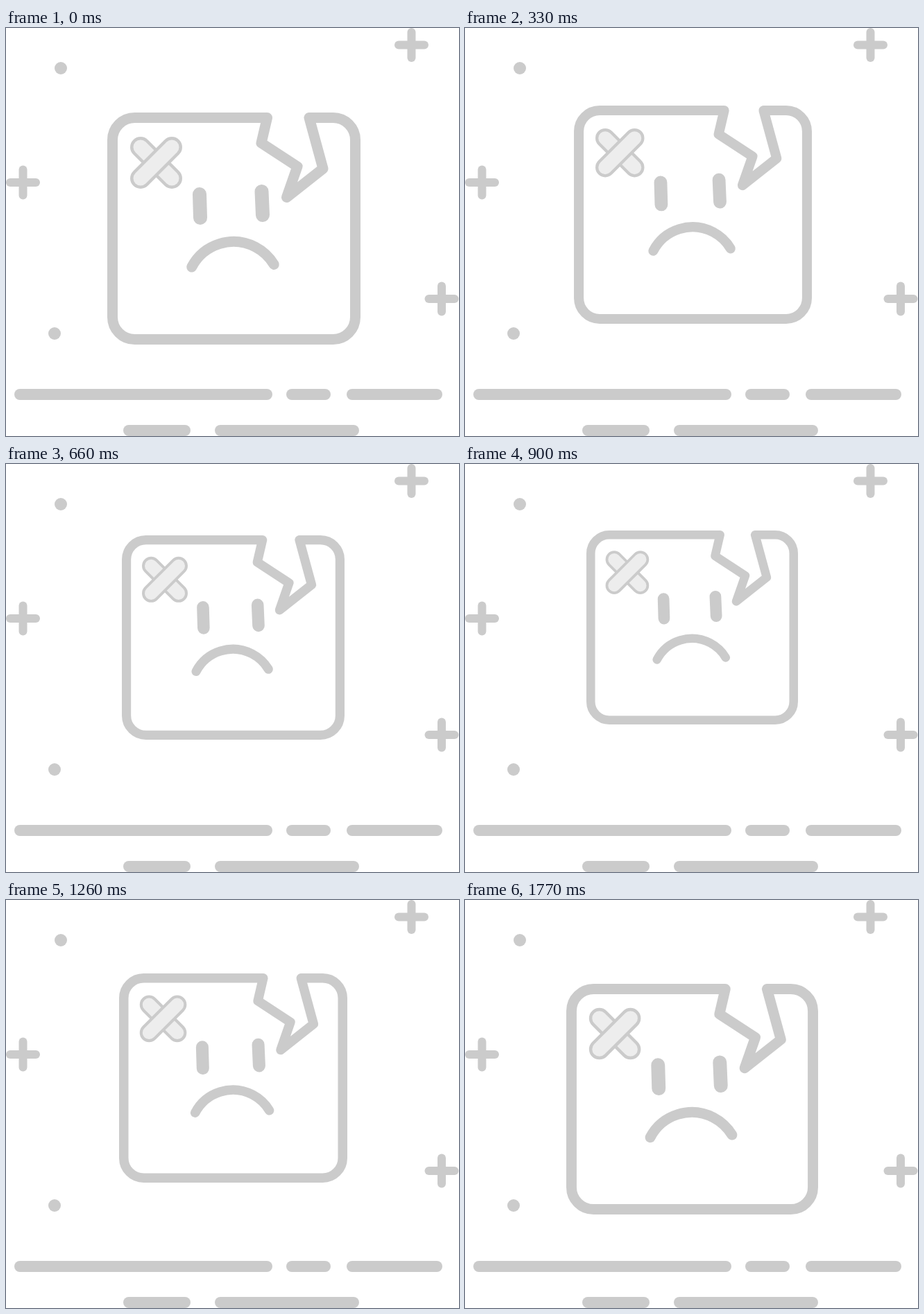
An HTML page with a canvas that plays this animation: 653 by 589 pixels, repeating every 1800 ms.

```html
<!DOCTYPE html>
<html lang="en">
<head>
<meta charset="utf-8">
<title>Broken page</title>
<style>
  html, body { margin: 0; width: 100%; height: 100%; overflow: hidden; background: #fff; }
  canvas { display: block; }
</style>
</head>
<body>
<canvas id="stage" width="653" height="589"></canvas>
<script>
const ctx = document.getElementById('stage').getContext('2d');
const GRAY = '#cbcbcb', PALE = '#ededed';
const STEP = 30, HALF = 30;

// Face box edges: left, top, right, bottom
const BIG = [146, 122, 511, 457];
const SMALL = [175, 96, 480, 376];
const END = [145, 122, 510, 457];

function line(width, color, ...pts) {
  ctx.lineWidth = width;
  ctx.strokeStyle = color;
  ctx.beginPath();
  for (let i = 0; i < pts.length; i += 2) ctx.lineTo(pts[i], pts[i + 1]);
  ctx.stroke();
}

function dot(x, y) {
  ctx.fillStyle = GRAY;
  ctx.beginPath();
  ctx.arc(x, y, 9, 0, Math.PI * 2);
  ctx.fill();
}

function plus(x, y) {
  line(12, GRAY, x - 18.5, y, x + 18.5, y);
  line(12, GRAY, x, y - 18.5, x, y + 18.5);
}

function bar(x1, x2, y) {
  line(16, GRAY, x1 + 8, y, x2 - 8, y);
}

function plaster(x1, y1, x2, y2) {
  line(30, GRAY, x1, y1, x2, y2);
  line(21, PALE, x1, y1, x2, y2);
}

function scenery() {
  dot(79, 58);
  dot(70, 441);
  plus(584.5, 24.5);
  plus(24.5, 223);
  plus(628, 391);
  bar(12, 384, 529);
  bar(404, 468, 529);
  bar(491, 629, 529);
  bar(169, 266, 581);
  bar(301, 509, 581);
}

function face() {
  const l = 153.5, t = 129.5, r = 503.5, b = 449.5, rad = 32;
  ctx.lineWidth = 15;
  ctx.strokeStyle = GRAY;
  ctx.beginPath();
  ctx.moveTo(437, t);
  ctx.arcTo(r, t, r, b, rad);
  ctx.arcTo(r, b, l, b, rad);
  ctx.arcTo(l, b, l, t, rad);
  ctx.arcTo(l, t, r, t, rad);
  ctx.lineTo(376.5, t);
  ctx.lineTo(368, 166);
  ctx.lineTo(420, 200);
  ctx.lineTo(404.5, 244.5);
  ctx.lineTo(457, 203);
  ctx.closePath();
  ctx.stroke();

  plaster(194, 172, 239, 217);
  plaster(194, 217, 239, 172);

  line(20, GRAY, 279, 240, 280, 274);
  line(20, GRAY, 368.5, 236, 370, 270);

  ctx.lineWidth = 15;
  ctx.beginPath();
  ctx.arc(328, 376.5, 68, Math.atan2(-31, -59.5), Math.atan2(-35.5, 59));
  ctx.stroke();
}

function draw(time) {
  const n = Math.floor(time / STEP) % (2 * HALF);
  const [from, to] = n < HALF ? [BIG, SMALL] : [SMALL, END];
  const k = (n % HALF) / HALF;
  const [l, t, r, b] = from.map((v, i) => Math.round(v + (to[i] - v) * k));

  ctx.fillStyle = '#fff';
  ctx.fillRect(0, 0, 653, 589);
  ctx.lineCap = ctx.lineJoin = 'round';
  scenery();

  ctx.save();
  ctx.translate(l, t);
  ctx.scale((r - l) / (BIG[2] - BIG[0]), (b - t) / (BIG[3] - BIG[1]));
  ctx.translate(-BIG[0], -BIG[1]);
  face();
  ctx.restore();
}

const start = performance.now();
function tick() {
  draw(performance.now() - start);
  requestAnimationFrame(tick);
}
tick();
</script>
</body>
</html>
```
